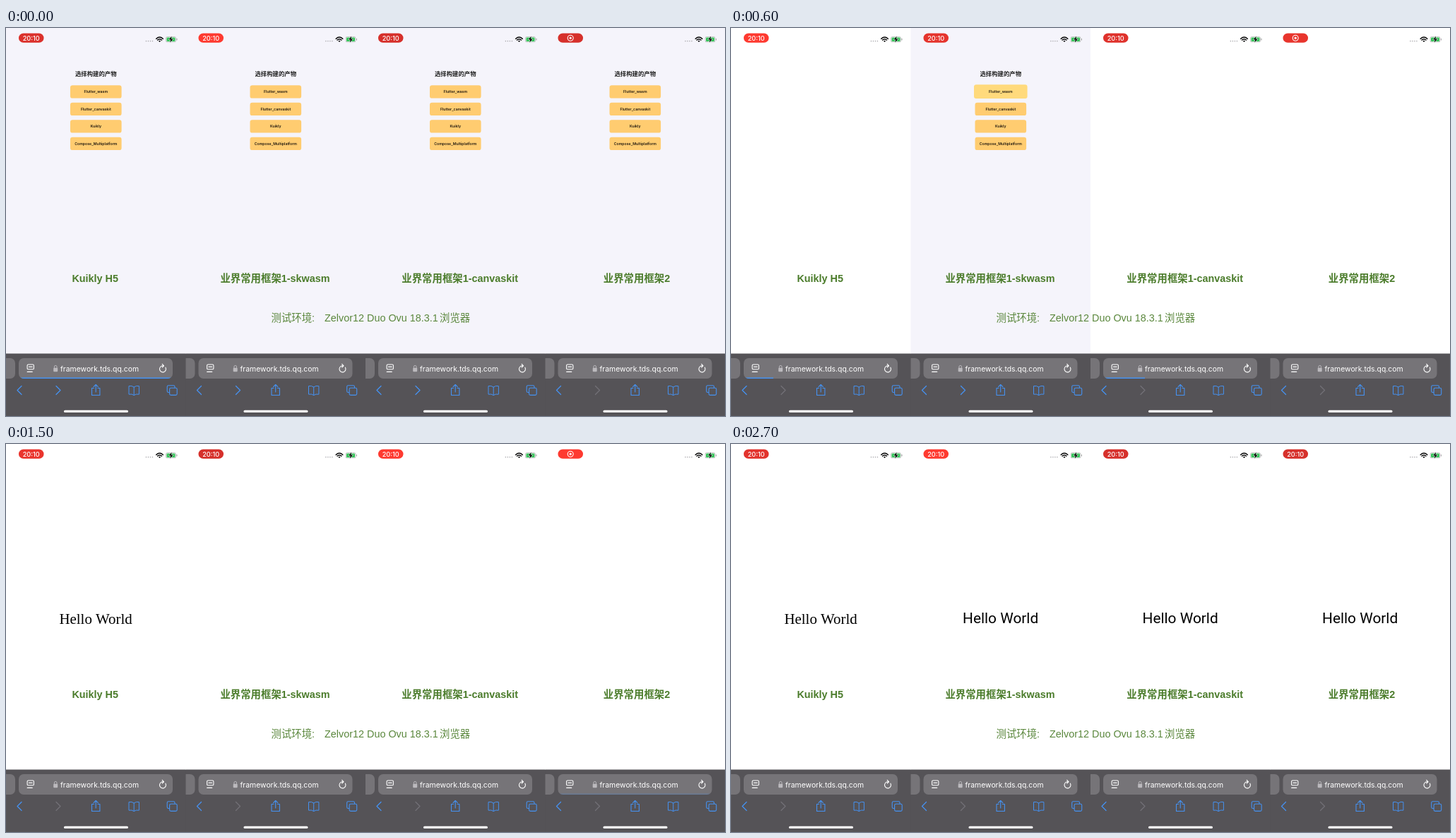
These frames come from a looping animation (1018x550 px, 2800 ms). An HTML page with a canvas:

```html
<!DOCTYPE html>
<html lang="zh">
<head>
<meta charset="utf-8">
<style>
html, body { margin: 0; width: 100%; height: 100%; overflow: hidden; background: #fff; }
canvas { display: block; }
</style>
</head>
<body>
<canvas id="stage" width="1018" height="550"></canvas>
<script>
const ctx = document.getElementById('stage').getContext('2d');
const LOOP = 2800, STEP = 100, PANEL = 254.5, PULSE = 2600;
const UI = 'Inter, "Noto Sans CJK SC", sans-serif';
const CAPTION = '"Liberation Sans", "Noto Sans CJK SC", "Noto Sans CJK", sans-serif';
const SERIF = '"Liberation Serif", serif';
const BLUE = '#4592f2', GREEN = '#4b7c2b', SOFT_GREEN = '#5a873c';
const BUTTONS = ['Flutter_wasm', 'Flutter_canvaskit', 'Kuikly', 'Compose_Multiplatform'];

// Times in ms: press, white page, greeting, progress [start, full, fade start, fade end].
const panels = [
  { label: 'Kuikly H5', x: 126.2, button: 2, press: 400, load: 600, hello: 700,
    progress: [560, 950, 1200, 1450], first: 0.1, peak: 850, font: SERIF },
  { label: '业界常用框架1-skwasm', x: 381, button: 0, press: 600, load: 700, hello: 1700,
    progress: [770, 1050, 1200, 1450], first: 0, peak: 2480, font: 'Roboto, sans-serif' },
  { label: '业界常用框架1-canvaskit', x: 642.7, button: 1, press: 400, load: 600, hello: 1800,
    progress: [530, 900, 1200, 1450], first: 0.1, peak: 1400, font: 'Roboto, sans-serif' },
  { label: '业界常用框架2', x: 893, button: 3, press: 400, load: 600, hello: 2200,
    progress: [770, 1050, 1250, 1580], first: 0, peak: 1270, font: 'Roboto, sans-serif' }
];

const clamp = v => Math.max(0, Math.min(1, v));
const ramp = (t, a, b) => clamp((t - a) / (b - a));

function text(s, x, y, font, color, align = 'center') {
  ctx.font = font;
  ctx.fillStyle = color;
  ctx.textAlign = align;
  ctx.fillText(s, x, y);
}

function box(x, y, w, h, r, color) {
  ctx.fillStyle = color;
  ctx.beginPath();
  ctx.roundRect(x, y, w, h, r);
  ctx.fill();
}

function stroke(d, color, width = 1.1) {
  ctx.strokeStyle = color;
  ctx.lineWidth = width;
  ctx.stroke(new Path2D(d));
}

function fill(d, color) {
  ctx.fillStyle = color;
  ctx.fill(new Path2D(d));
}

function dot(x, y, r, color) {
  ctx.fillStyle = color;
  ctx.beginPath();
  ctx.arc(x, y, r, 0, 7);
  ctx.fill();
}

function drawStatus(t, p, recording) {
  const level = clamp(0.5 + 0.8 * Math.cos((t - p.peak) / PULSE * 2 * Math.PI));
  const red = `rgb(${214 + 40 * level}, ${48 + 10 * level}, ${43 + 5 * level})`;
  box(18, 7.5, 35.5, 13.3, 6.6, red);
  if (recording) {
    stroke('M39.7 14.2a4 4 0 1 1 -8 0a4 4 0 1 1 8 0', '#fff', 1.1);
    dot(35.7, 14.2, 1.6, '#fff');
  } else {
    text('20:10', 35.7, 17.5, '500 9.2px ' + UI, '#fff');
  }
  for (let i = 0; i < 4; i++) dot(198.4 + i * 3, 18.6, 0.8, '#aaa9ae');
  stroke('M212.7 15.2q4.8 -4.4 9.6 0M214.5 17q3 -2.6 6 0', '#000', 1.5);
  fill('M215.9 18.3q1.6 -1.3 3.2 0l-1.6 1.8z', '#000');

  const bolt = 'M234.7 11.6l-4.2 5h2.7l-1 4.2l4.5 -5.2h-2.8z';
  box(226.2, 12.2, 14.6, 8, 2.3, '#aeb4b0');
  box(226.9, 12.9, 13.2, 6.6, 1.8, '#fff');
  box(227.5, 13.4, 12, 5.6, 1.3, '#35c45a');
  box(241.4, 14.8, 1.1, 2.8, 0.5, '#aaa');
  stroke(bolt, '#fff', 1);
  fill(bolt, '#000');
}

function drawMenu(t, p) {
  text('选择构建的产物', 127.3, 68.1, 'bold 8.4px "Noto Sans CJK SC", "Noto Sans CJK", sans-serif', '#222');
  BUTTONS.forEach((name, i) => {
    const y = 81.2 + i * 24.5;
    const pressed = t >= p.press && i === p.button;
    const grow = pressed ? 1.5 : 0;
    box(91 - grow, y - grow * 0.6, 72.6 + grow * 2, 18.4 + grow * 0.8, 3.2, pressed ? '#ffda7c' : '#ffcc70');
    text(name, 127.3, y + 11 - grow * 0.2, '600 5.2px ' + UI, '#211a10');
  });
}

function drawBrowser(t, p, index) {
  box(0, 461.5, PANEL + 0.5, 88.5, 0, '#555357');
  box(0, 468, 13, 29, [0, 7, 7, 0], '#767478');
  box(18, 468, 218, 29, 7, '#767478');

  // Page settings icon
  stroke('M31.5 477h6.5q1.4 0 1.4 1.4v4q0 1.4 -1.4 1.4h-6.5q-1.4 0 -1.4 -1.4v-4q0 -1.4 1.4 -1.4zM32.4 480.4h4.8M30.2 487.4h7', '#fff', 1.1);

  const busy = t >= p.press && t < p.load && index !== 1;
  if (busy) {
    stroke('M218 479l8 8M226 479l-8 8', '#fff');
  } else {
    stroke('M68.4 482v-1.8a1.8 1.8 0 0 1 3.6 0v1.8', '#bbb9bd', 1);
    box(67.2, 481.7, 6, 5.5, 1, '#bbb9bd');
    stroke('M225.9 481.2a4.5 4.5 0 1 1 -3.9 -2.3h1.2M221.2 476.4l2.3 2.4l-2.3 2.3', '#fff');
  }
  text('framework.tds.qq.com', busy ? 71 : 77, 486.6, '10.4px ' + UI, '#fff', 'left');

  const [start, full, fade, gone] = p.progress;
  let amount = 0, alpha = 0;
  if (t < 300 && index === 0) {
    amount = 1;
    alpha = 1 - ramp(t, 0, 300);
  } else if (t >= p.load) {
    amount = p.first + (1 - p.first) * ramp(t, start, full);
    alpha = 1 - ramp(t, fade, gone);
  }
  if (alpha > 0) {
    ctx.save();
    ctx.beginPath();
    ctx.roundRect(18, 468, 218, 29, 7);
    ctx.clip();
    ctx.globalAlpha = alpha;
    box(18, 495.4, 218 * amount, 1.6, 0, BLUE);
    ctx.restore();
  }

  const canForward = index < 3 && t < p.load;
  stroke('M22 507.5l-6 6l6 6', BLUE, 1.3);
  stroke('M71 507.5l6 6l-6 6', canForward ? BLUE : '#737177', 1.3);
  stroke('M124.5 510.5h-3v10h11.4v-10h-3M127.2 516v-10.4M124 508.7l3.2 -3.2l3.2 3.2', BLUE);
  stroke('M181.2 509q-3 -2.4 -7.2 -1.4v11.6q4.2 -.9 7.2 1.4q3 -2.3 7.2 -1.4v-11.6q-4.2 -1 -7.2 1.4v11.6', BLUE, 1);
  stroke('M231.6 516.5h-1.6q-1.8 0 -1.8 -1.8v-6.2q0 -1.8 1.8 -1.8h7.2q1.8 0 1.8 1.8v1.7M233.4 510.2h7q1.8 0 1.8 1.8v6.6q0 1.8 -1.8 1.8h-7q-1.8 0 -1.8 -1.8v-6.6q0 -1.8 1.8 -1.8z', BLUE);
  box(82, 541.8, 91, 3.2, 1.6, '#fff');
}

function drawPanel(t, p, index) {
  ctx.save();
  ctx.translate(index * PANEL, 0);
  const loaded = t >= p.load;
  box(0, 0, PANEL + 0.5, 462, 0, loaded ? '#fff' : '#f5f4fb');
  drawStatus(t, p, index === 3 && t < 2500);
  if (!loaded) drawMenu(t, p);
  if (t >= p.hello) text('Hello World', 127.1, index ? 254 : 255, '20.88px ' + p.font, '#000');
  drawBrowser(t, p, index);
  ctx.restore();
}

function drawCaptions() {
  for (const p of panels) text(p.label, p.x, 360, 'bold 14.4px ' + CAPTION, GREEN);
  const font = '14.4px ' + CAPTION;
  text('测试环境:', 375.5, 416.2, font, SOFT_GREEN, 'left');
  text('Zelvor12 Duo Ovu 18.3.1', 451, 416.2, font, SOFT_GREEN, 'left');
  text('浏览器', 614, 416.2, font, SOFT_GREEN, 'left');
}

function frame(now) {
  const t = Math.floor(now % LOOP / STEP) * STEP;
  ctx.clearRect(0, 0, 1018, 550);
  panels.forEach((p, i) => drawPanel(t, p, i));
  drawCaptions();
  requestAnimationFrame(frame);
}

ctx.lineCap = ctx.lineJoin = 'round';
requestAnimationFrame(frame);
</script>
</body>
</html>
```
